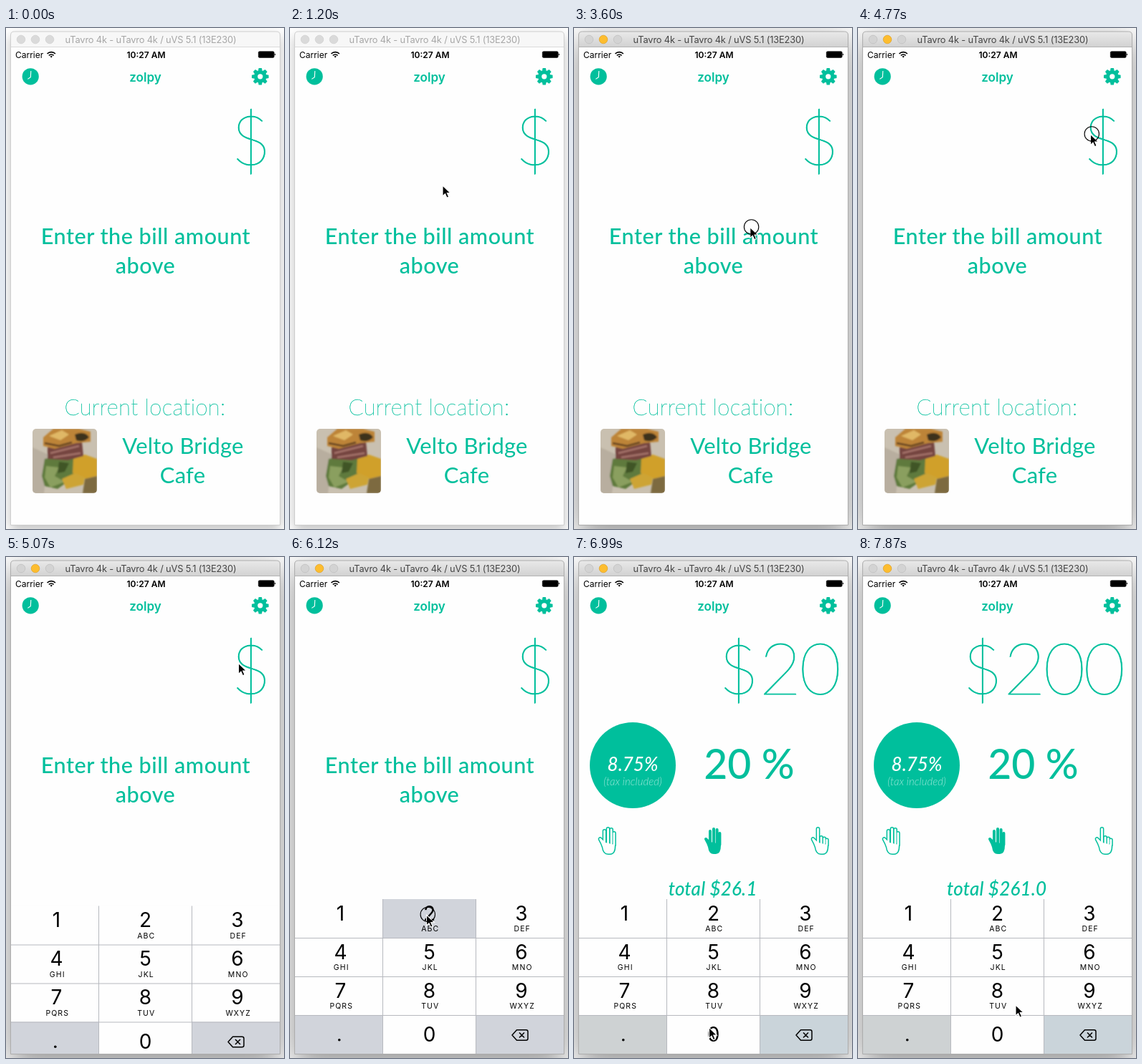
These frames come from a looping animation (388x700 px, 8 s). An HTML page:

```html
<!DOCTYPE html>
<html lang="en">
<head>
<meta charset="utf-8">
<title>Tip calculator</title>
<style>
html, body { margin: 0; width: 100%; height: 100%; overflow: hidden; background: #fff; }
svg { display: block; width: 388px; height: 700px; }
text { font-family: Inter, "Liberation Sans", sans-serif; text-anchor: middle; }
.lato { font-family: Lato, "Open Sans", sans-serif; fill: #00bf9c; }
.thin { font-weight: 100; stroke: #00bf9c; }
.mid { font-weight: 500; }
.it { font-style: italic; }
.white { fill: #fff; }
.teal { fill: #00bf9c; }
</style>
</head>
<body>
<svg viewBox="0 0 388 700">
  <defs>
    <filter id="wide" filterUnits="userSpaceOnUse" x="-80" y="-80" width="548" height="860"><feGaussianBlur stdDeviation="20"/></filter>
    <filter id="near" filterUnits="userSpaceOnUse" x="-80" y="-80" width="548" height="860"><feGaussianBlur stdDeviation="8"/></filter>
    <filter id="soft"><feGaussianBlur stdDeviation="1.1"/></filter>
    <linearGradient id="barOn" x2="0" y2="1">
      <stop offset="0" stop-color="#e9e9e9"/><stop offset="1" stop-color="#d1d1d1"/>
    </linearGradient>
    <clipPath id="screen"><path d="M7 27h375v667H7z"/></clipPath>
    <clipPath id="thumb"><rect x="37" y="560" width="90" height="90" rx="5"/></clipPath>
  </defs>

  <rect id="shadeOff" x="6" y="11" width="377" height="690" rx="5" opacity=".25" filter="url(#near)"/>
  <rect id="shadeOn" x="6" y="17" width="377" height="690" rx="5" opacity=".45" filter="url(#wide)"/>
  <path id="bar" d="M6 27V10q0-5 5-5h367q5 0 5 5v17z"/>
  <path id="edge" d="M6.5 694.5V10q0-5 5-5h366q5 0 5 5v684.5z" fill="none"/>
  <path d="M7 27h375v667H7z" fill="#fefefe"/>
  <path id="rule" d="M7 26.5h375"/>
  <g id="dots" stroke-width=".7">
    <circle cx="21" cy="16" r="5.8"/><circle cx="41" cy="16" r="5.8"/><circle cx="61" cy="16" r="5.8"/>
  </g>
  <text id="title" x="202" y="21" font-size="12.8" letter-spacing="-.15">uTavro 4k - uTavro 4k / uVS 5.1 (13E230)</text>

  <g font-size="12">
    <text x="13" y="41.5" style="text-anchor:start">Carrier</text>
    <text x="195.5" y="41.5" font-weight="600">10:27 AM</text>
  </g>
  <g fill="none" stroke="#000" stroke-width="1.6">
    <path d="M57.5 36a8 8 0 0 1 11.4 0M59.8 38.4a5 5 0 0 1 6.8 0"/>
    <path d="M63.2 41.6l-1.7-1.9a2.6 2.6 0 0 1 3.4 0z" fill="#000" stroke="none"/>
    <rect x="352.3" y="32.8" width="21.9" height="8.6" rx="1.6" fill="#000" stroke-width=".6"/>
    <path d="M375 35.5q2.4 1.5 0 3z" fill="#000" stroke="none"/>
  </g>

  <circle class="teal" cx="34.2" cy="67.8" r="11.6"/>
  <path d="M34.8 60l-.5 8.6-4 2.8" fill="none" stroke="#fff" stroke-width="1.1"/>
  <text class="teal" x="194.5" y="75" font-size="17" font-weight="600">zolpy</text>
  <g id="gear" class="teal" transform="translate(354.8 67.8)">
    <circle r="8.8"/><circle class="white" r="3.6"/>
  </g>

  <g clip-path="url(#screen)">
    <text id="sign" class="lato thin" font-size="96" stroke-width="1">$</text>
    <text id="digits" class="lato thin" x="370" y="192" font-size="101" letter-spacing="-3" stroke-width=".9" style="text-anchor:end"></text>
    <g id="prompt" class="lato mid" font-size="30.6" letter-spacing=".5">
      <text class="lato" x="195" y="302">Enter the bill amount</text>
      <text class="lato" x="194.5" y="342.5">above</text>
    </g>

    <g id="place">
      <text class="lato thin" x="194" y="541" font-size="31" letter-spacing=".3" stroke-width=".35">Current location:</text>
      <g clip-path="url(#thumb)">
        <path d="M37 560h90v90H37z" fill="#c9c0b0"/>
        <g filter="url(#soft)">
          <path d="M37 586l22 10-6 54H37z" fill="#b8ae9f"/>
          <path d="M54 602l34-6 18 10-8 14-12 14-14 10-18-4-4-14z" fill="#5f7a3c"/>
          <path d="M56 612l18 2-6 12 14 8-20 8-8-14z" fill="#8a9f5e"/>
          <path d="M74 606l14 2-6 12-10 2z" fill="#3f5528"/>
          <path d="M94 602l16-6 17 6v24l-16 4-18-8z" fill="#d0a02c"/>
          <path d="M78 630l18-8 14 6-2 10-24 6z" fill="#cda436"/>
          <path d="M110 630l17-4v24h-20z" fill="#7d6a40"/>
          <path d="M58 586l28-10 20 2 2 20-22 6-28-2z" fill="#74453f"/>
          <path d="M62 594l40-10M66 600l38-6" stroke="#a5736b" stroke-width="2.5"/>
          <path d="M52 572l14-12h36l16 4v14l-20 2-30 8-16-4z" fill="#bd8438"/>
          <path d="M60 570l18-8 10 6-12 8z" fill="#e0b866"/>
          <path d="M96 568q14-6 20 4-8 8-18 4z" fill="#3c301e"/>
          <path d="M54 580l20 4 18-5" fill="none" stroke="#5d3e22" stroke-width="2.5"/>
        </g>
      </g>
      <g font-size="31" letter-spacing=".2">
        <text class="lato" x="247" y="595">Velto Bridge</text>
        <text class="lato" x="246.5" y="635.5">Cafe</text>
      </g>
    </g>

    <g id="tip">
      <circle class="teal" cx="82" cy="291" r="60"/>
      <text class="lato mid it white" x="82" y="299" font-size="26">8.75%</text>
      <text class="lato it white" x="82" y="319" font-size="15" font-weight="300" opacity=".6">(tax included)</text>
      <text class="lato mid" x="244.5" y="309.5" font-size="57">20 %</text>
      <g id="hands"></g>
      <text id="total" class="lato mid it" x="193.7" y="473" font-size="26" letter-spacing=".2"></text>
    </g>
    <g id="pad"></g>
  </g>

  <g id="mouse">
    <path d="M0 0v14.8l3.5-3.2 2.5 5.6 2.6-1.1-2.4-5.5h4.8z" stroke="#fff" stroke-width="1.1"/>
    <circle id="ring" cx="1.8" cy="-.6" r="10.2" fill="none" stroke="#000" stroke-width="1.1"/>
  </g>
</svg>
<script>
const LOOP = 8000, TEAL = '#00bf9c', PAPER = '#fefefe', GREY = '#d1d4db';
const $ = id => document.getElementById(id);

function add(parent, tag, attrs, text) {
  const el = document.createElementNS('http://www.w3.org/2000/svg', tag);
  for (const k in attrs) el.setAttribute(k, attrs[k]);
  if (text) el.textContent = text;
  return parent.appendChild(el);
}

for (let i = 0; i < 8; i++)
  add($('gear'), 'path', { d: 'M-2.9-8L-2.1-11.8H2.1L2.9-8z', transform: `rotate(${i * 45})` });

// Hands: round strokes; an outline is a wide teal pass under a narrow light one
const FOUR = 'M9 7V24M14 4V24M18.6 5V24M22.4 10V26', ONE = 'M10 4V24M14.6 16V24M18.8 17.5V24M22.4 19.5V26';
const PALM = 'M3 18Q6.5 24 8 29Q9 37 14 37H17Q22 37 22 27L9 24Z';
const OUTLINE = [[5.8, TEAL], [2.8, PAPER]], SOLID = [[4, TEAL]];
function hand(x, fingers, passes) {
  const g = add($('hands'), 'g', {
    transform: `translate(${x} 376)`, 'stroke-linecap': 'round', 'stroke-linejoin': 'round'
  });
  for (const [w, c] of passes) {
    add(g, 'path', { d: fingers, fill: 'none', stroke: c, 'stroke-width': w });
    add(g, 'path', { d: PALM, fill: c, stroke: c, 'stroke-width': w });
  }
}
hand(33.5, FOUR, OUTLINE);
hand(181, FOUR, SOLID);
hand(330.5, ONE, OUTLINE);

const COLS = [[7, 123, 70.5], [130, 129, 194.5], [260, 122, 323]];
const LETTERS = ['', 'ABC', 'DEF', 'GHI', 'JKL', 'MNO', 'PQRS', 'TUV', 'WXYZ'];
const pad = $('pad'), keys = [];
add(pad, 'path', { d: 'M7 478h375v216H7z', fill: PAPER });
for (let i = 0; i < 12; i++) {
  const [x, w, cx] = COLS[i % 3], y = 478 + 54 * Math.floor(i / 3);
  keys.push(add(pad, 'rect', { x, y, width: w, height: 54 }));
  const label = i < 9 ? i + 1 : i === 10 ? 0 : '';
  if (label !== '') add(pad, 'text', { x: cx, y: y + (i < 9 ? 29.5 : 37), 'font-size': 28 }, String(label));
  if (LETTERS[i]) add(pad, 'text', { x: cx + 1.2, y: y + 45, 'font-size': 10.5, 'letter-spacing': 1.1 }, LETTERS[i]);
}
add(pad, 'path', {
  d: 'M7 532.5h375M7 586.5h375M7 640.5h375M129.5 478v216M259.5 478v216', stroke: '#b7b9bf'
});
add(pad, 'circle', { cx: 68.8, cy: 674.8, r: 1.8 });
add(pad, 'path', {
  d: 'M310 668l6.5-7.2h13q2.5 0 2.5 2.5v9.4q0 2.5-2.5 2.5h-13zM320 664.5l7 7M327 664.5l-7 7',
  fill: 'none', stroke: '#000', 'stroke-width': 1.5, 'stroke-linejoin': 'round'
});

// Pointer: time, x, y
const MOVES = [
  [450, 228, 128], [600, 190.5, 137], [900, 193, 165], [1050, 203, 198], [1200, 213, 220],
  [1500, 216, 226], [1650, 222, 238], [1800, 230, 252], [1950, 238, 264], [2100, 243, 274], [2250, 245.8, 278.5],
  [4040, 250, 270], [4190, 267, 245], [4330, 291, 210], [4480, 312, 175], [4630, 322, 155], [4770, 324.5, 148.5],
  [5220, 320, 165], [5370, 300, 220], [5520, 270, 300], [5660, 238, 390], [5810, 208, 460], [5960, 191, 495],
  [6120, 190.5, 500], [6410, 191, 525], [6550, 190, 590], [6700, 188.5, 645], [6840, 188.5, 657.5], [7870, 220, 626]
];
// Clicks: start, end, pressed key
const CLICKS = [[3600, 3750], [4770, 4920], [6120, 6260, 1], [6840, 6990, 10], [7130, 7280, 10]];
const SLIDE = [[0, 222], [4920, 95], [5070, 9.5], [5220, 0]];
const BILLS = [[0, '', ''], [6260, '2', '$2.61'], [6990, '20', '$26.1'], [7280, '200', '$261.0']];

const at = (table, t) => table.filter(row => row[0] <= t).pop();
const set = (id, attrs) => { for (const k in attrs) $(id).setAttribute(k, attrs[k]); };
const show = (id, on) => set(id, { visibility: on ? 'visible' : 'hidden' });

function render(t) {
  const active = t >= 3600, tipped = t >= 6260;
  show('shadeOn', active);
  show('shadeOff', !active);
  set('bar', { fill: active ? 'url(#barOn)' : '#f7f7f7' });
  set('edge', { stroke: active ? '#adadad' : '#cfcfcf' });
  set('rule', { stroke: active ? '#b3b3b3' : '#dadada' });
  set('title', { fill: active ? '#454545' : '#a6a6a6' });
  set('dots', { fill: active ? '#d3d3d3' : '#dadada', stroke: active ? '#bdbdbd' : '#cecece' });
  const dot = $('dots').children[1];
  dot.setAttribute('fill', active ? '#fdbd2f' : '#dadada');
  dot.setAttribute('stroke', active ? '#dfa023' : '#cecece');

  const [, digits, total] = at(BILLS, t);
  $('digits').textContent = digits;
  // The skew stands the slanted bar of the sign upright
  set('sign', { transform: `translate(${342.5 - 56 * digits.length} 191) skewX(2)` });
  $('total').textContent = 'total ' + total;
  show('prompt', !tipped);
  show('place', !tipped);
  show('tip', tipped);

  const click = CLICKS.find(c => t >= c[0] && t < c[1]);
  pad.setAttribute('transform', `translate(0 ${at(SLIDE, t)[1]})`);
  keys.forEach((key, i) => key.setAttribute('fill',
    i === 9 ? (tipped ? '#ced2d3' : GREY) :
    i === 11 ? (tipped ? '#cad4da' : GREY) :
    click && click[2] === i ? GREY : PAPER));

  const pos = at(MOVES, t);
  show('mouse', pos);
  show('ring', pos && click);
  if (pos) set('mouse', { transform: `translate(${pos[1]} ${pos[2]})` });
}

const start = performance.now();
function tick(now) {
  render(Math.max(0, now - start) % LOOP);
  requestAnimationFrame(tick);
}
render(0);
requestAnimationFrame(tick);
</script>
</body>
</html>
```
